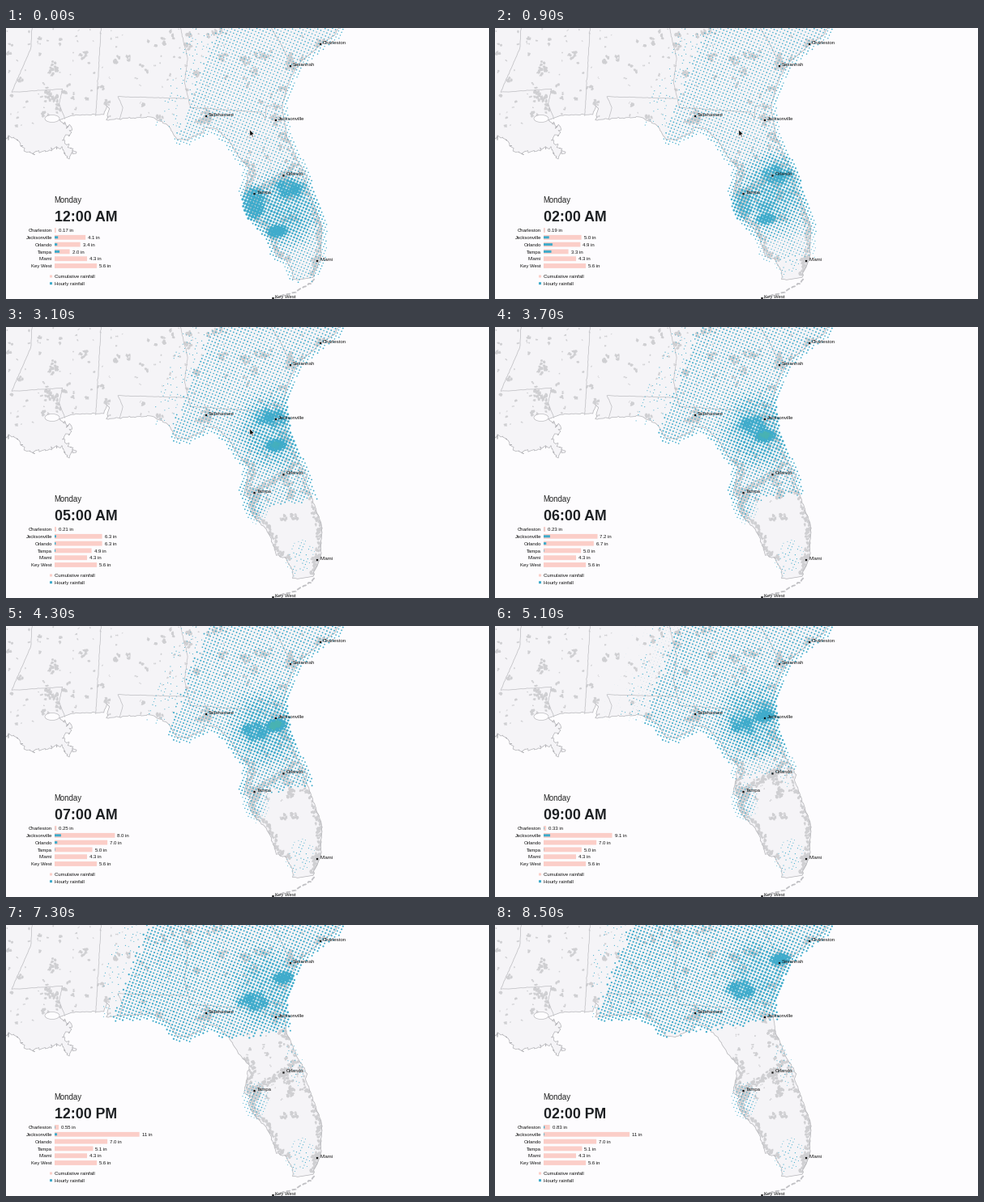
Animation of 596x335 px, one loop 8.6 s. Source, as a matplotlib script:

```python
import numpy as np
import matplotlib.pyplot as plt
from matplotlib.animation import FuncAnimation
from matplotlib.collections import PolyCollection
from matplotlib.patches import Ellipse, Polygon, Rectangle
from matplotlib.path import Path

W, H, DPI = 596, 335, 100
FRAMES, STEP = 86, 100
PX = 72 / DPI
SEA, LAND, EDGE, URBAN = "#fdfcfe", "#f5f4f7", "#b2b2b6", "#cfcfd2"
PINK, BLUE, INK = "#fbcec8", "#3fabca", "#111111"
RGB_LOW = np.array([63, 171, 203]) / 255
RGB_HIGH = np.array([72, 178, 178]) / 255
rng = np.random.default_rng(7)


def project(points):
    """Equidistant conic projection from (lon, lat) to stage pixels."""
    lon, lat = np.radians(np.asarray(points, float)).T
    lat0, lon0, radius = np.radians(29), np.radians(-83), 2189
    rho0 = radius / np.tan(lat0)
    rho = rho0 + radius * (lat0 - lat)
    a = np.sin(lat0) * (lon - lon0)
    return np.c_[288.8 + rho * np.sin(a), 164.1 - rho0 + rho * np.cos(a)]


def roughen(pts, jitter, step=2.5):
    """Subdivide a line and shake the new points."""
    out = []
    for p, q in zip(pts[:-1], pts[1:]):
        n = max(1, int(np.hypot(*(q - p)) / step))
        s = np.linspace(0, 1, n, endpoint=False)[:, None]
        part = p + (q - p) * s
        part[1:] += rng.normal(0, jitter, (n - 1, 2))
        out.append(part)
    return np.vstack(out + [pts[-1:]])


# Key points of the coast and the state lines (lon, lat)
ATLANTIC = [(-78.6, 33.85), (-79.18, 33.25), (-79.38, 33.0), (-79.87, 32.74),
            (-80.67, 32.2), (-81.05, 31.75), (-81.28, 31.2), (-81.42, 30.7),
            (-81.27, 29.85), (-80.92, 29.05), (-80.53, 28.46), (-80.6, 28.3),
            (-80.1, 27.0), (-80.03, 26.75), (-80.12, 25.8), (-80.4, 25.2)]
GULF = [(-80.95, 25.13), (-81.13, 25.15), (-81.12, 25.4), (-81.35, 25.8),
        (-81.7, 25.9), (-81.87, 26.43), (-82.1, 26.8), (-82.45, 27.1),
        (-82.7, 27.52), (-82.43, 27.92), (-82.65, 27.7), (-82.85, 27.9),
        (-82.65, 28.75), (-83.06, 29.13), (-83.4, 29.65), (-83.9, 30.03),
        (-84.35, 30.06), (-84.35, 29.92), (-85.0, 29.65), (-85.35, 29.68),
        (-85.7, 30.12), (-86.3, 30.37), (-88.0, 30.23), (-87.9, 30.6),
        (-88.0, 30.68), (-88.1, 30.4), (-89.3, 30.32)]
DELTA = [(-89.75, 30.15), (-89.25, 29.85), (-89.6, 29.5), (-89.05, 29.15),
         (-89.4, 28.95), (-89.6, 29.3), (-90.2, 29.1), (-90.9, 29.05),
         (-91.4, 29.5), (-92.2, 29.55)]
BORDERS = [
    [(-91.0, 33.3), (-91.0, 32.4), (-91.6, 30.95), (-89.7, 31.16),
     (-89.8, 30.67), (-89.55, 30.2)],
    [(-88.35, 33.4), (-88.4, 30.35)],
    [(-87.5, 30.28), (-87.4, 30.65), (-87.6, 31.0), (-85.0, 31.0)],
    [(-85.4, 33.6), (-85.0, 32.3), (-85.1, 31.5), (-84.86, 30.71),
     (-82.22, 30.57), (-82.05, 30.36), (-82.02, 30.78), (-81.43, 30.71)],
    [(-81.95, 33.5), (-81.42, 32.75), (-81.15, 32.25), (-80.88, 32.04)],
]
ISLANDS = [(-80.35, 25.15), (-80.6, 24.95), (-81.1, 24.72), (-81.8, 24.56)]
CITIES = [("Charleston", 388, 20), ("Savannah", 351, 47),
          ("Jacksonville", 333, 114), ("Tallahassee", 247, 109),
          ("Orlando", 342.5, 182.5), ("Tampa", 306.5, 205),
          ("Miami", 384, 288), ("Key West", 329.5, 334)]

fig = plt.figure(figsize=(W / DPI, H / DPI), dpi=DPI, facecolor=SEA)
ax = fig.add_axes([0, 0, 1, 1])
ax.set(xlim=(0, W), ylim=(H, 0))
ax.axis("off")

# Base map
east, west = roughen(project(ATLANTIC), 0.4), roughen(project(GULF), 0.5)
coast = np.vstack([east, west, roughen(project(DELTA), 1.7, 2)])
shape = np.vstack([coast, [(-30, 140), (-30, -30), (440, -30)]])
land = Path(shape)
ax.add_patch(Polygon(shape, fc=LAND, ec="none", zorder=1))


def town(x, y, rx, ry):
    """Ragged patch made of small overlapping polygons."""
    polys = []
    for _ in range(max(2, int(rx * ry / 2.5))):
        a, d = rng.uniform(0, 2 * np.pi), np.sqrt(rng.uniform(0, 1))
        cx, cy = x + rx * d * np.cos(a), y + ry * d * np.sin(a)
        t = np.linspace(0, 2 * np.pi, 7, endpoint=False)
        r = min(rx, ry, 2.4) * rng.uniform(0.4, 1.1, 7)
        polys.append(np.c_[cx + r * np.cos(t), cy + r * np.sin(t)])
    return polys


def scatter_towns(count, x0, x1, y0, y1, big):
    polys = []
    for x, y in rng.uniform((x0, y0), (x1, y1), (count, 2)):
        size = 1 + big * rng.uniform() ** 3
        polys += town(x, y, size * rng.uniform(0.7, 1.4), size)
    return polys


patches = scatter_towns(190, 0, 410, 0, 122, 4.5)
patches += scatter_towns(60, 295, 375, 125, 240, 4)
for _, x, y in CITIES[:-1]:
    patches += town(x, y, 7, 7)
for x, y in east[::3]:
    if y > 130:
        patches += town(x - 3, y, 2 + 2.5 * (y > 225), 4)
for x, y in west[::3]:
    if 165 < y < 285 and x < 345:
        patches += town(x + 4, y, 4, 4)
for s in np.linspace(0, 1.4, 8):
    patches += town(306 + 36 * s, 205 - 24 * s, 5, 4)
urban = ax.add_collection(PolyCollection(patches, fc=URBAN, ec="none", zorder=2))
urban.set_clip_path(land, ax.transData)

ax.plot(*coast.T, color=EDGE, lw=0.7 * PX, zorder=3)
for b in BORDERS:
    ax.plot(*roughen(project(b), 0.2).T, color="#c2c2c6", lw=0.8 * PX, zorder=3)
ax.add_patch(Ellipse((57, 112), 18, 9, fc=SEA, ec=EDGE, lw=0.6 * PX, zorder=3))
ax.plot(*roughen(project(ISLANDS), 0.8).T, color="#c0c0c4", lw=1.8 * PX,
        ls=(0, (3, 1.2)), zorder=3)


# Rain lattice: every third cell of a polar stereographic weather grid
MESH, MERIDIAN = 2496.35, np.radians(-105)


def to_grid(lon, lat):
    lon, lat = np.radians(lon), np.radians(lat)
    r = MESH * np.cos(lat) / (1 + np.sin(lat))
    return r * np.sin(lon - MERIDIAN), r * np.cos(lon - MERIDIAN)


def from_grid(x, y):
    lat = np.pi / 2 - 2 * np.arctan(np.hypot(x, y) / MESH)
    return np.degrees(np.c_[np.arctan2(x, y) + MERIDIAN, lat])


cells = 3 * np.arange(-150, 151)
ox, oy = to_grid(-83.554, 32.77)
gi, gj = np.meshgrid(ox + cells, oy + cells)
grid = project(from_grid(gi.ravel(), gj.ravel()))
grid = grid[(grid[:, 0] > 120) & (grid[:, 0] < 425)
            & (grid[:, 1] > -4) & (grid[:, 1] < H)]
near = np.any([land.contains_points(grid + 7 * np.array([np.cos(a), np.sin(a)]))
               for a in np.arange(0, 2 * np.pi, 0.6)], axis=0)
gx, gy = grid[near].T
grain = rng.uniform(0.88, 1.12, gx.size)
chance = rng.uniform(0, 1, gx.size)
lumps = 0.88 + 0.2 * np.sin(gx / 3.5 + gy / 9) * np.sin(gy / 4 - gx / 11)


def bump(x, y, sx, sy, deg=0):
    a = np.radians(deg)
    dx, dy = gx - x, gy - y
    u = (dx * np.cos(a) + dy * np.sin(a)) / sx
    v = (dy * np.cos(a) - dx * np.sin(a)) / sy
    return np.exp(-(u * u + v * v) ** 2)


def rain(h):
    """Dot radii at a whole hour."""
    # wide sheet whose south edge retreats while its west edge advances
    edge = np.interp(h, [0, 7, 10, 14], [258, 246, 178, 165])
    south = np.interp(h, [0, 3, 7, 10, 14], [325, 248, 212, 152, 128])
    across = gx + 0.38 * gy - edge
    sheet = (across > 8 * chance) & (gy + 0.15 * (gx - 300) < south - 8 * chance)
    fringe = (across > -30) & (across <= 8) & (chance < 0.3) & (gy < 130)

    # two heavy cells that travel north
    ax_, ay = (np.interp(h, [0, 10, 14], [335, 332, 352]),
               np.interp(h, [0, 3, 5, 14], [251, 205, 146, 42]))
    bx, by = (np.interp(h, [0, 3, 7, 14], [351, 345, 308, 304]),
              np.interp(h, [0, 3, 5, 7, 14], [199, 150, 112, 130, 80]))
    peak = 2.75 + 0.4 * np.exp(-((h - 7.5) / 3) ** 2)
    belt = (0.8 - 0.03 * h) * bump((ax_ + bx) / 2, (ay + by) / 2, 42, 45)

    light = np.where(sheet, 0.75 + 0.025 * h + belt, 0.55 * fringe) * grain
    tampa = (0.75 + 1.5 * np.exp(-h / 3)) * bump(307, 217, 19, 27) * grain
    showers = 0.62 * np.maximum(bump(363, 285, 20, 30, 20),
                                bump(357, 172, 12, 36, -15)) * (chance < 0.6)
    r = np.max([light, tampa, showers, peak * bump(ax_, ay, 16, 9, -8),
                2.6 * lumps * bump(bx, by, 25, 15, 5)], axis=0)
    return np.where(r < 0.4, 0, r)


fields = np.array([rain(h) for h in range(15)])
dots = ax.scatter(gx, gy, s=0, lw=0, zorder=4)


def label(x, y, text, size=6, color=INK, **kw):
    """Text whose capitals are centred on y; size in pixels."""
    return ax.text(x, y + 0.36 * size, text, fontsize=size * PX, color=color,
                   family="Liberation Sans", va="baseline", zorder=6, **kw)


def box(x, y, w, h, color):
    return ax.add_patch(Rectangle((x, y - h / 2), w, h, fc=color, ec="none",
                                  zorder=5, snap=False))


for name, x, y in CITIES:
    box(x - 1.1, y, 2.2, 2.2, INK)
    label(x + 3, y - 2.2, name)

# Side panel: running totals in inches at key hours
label(59.5, 212.3, "Monday", 9.7, "#222222")
clock = label(59.5, 232.8, "", 17.7, "#1c1f22", weight="bold")
HOURS = [-1, 0, 2, 3, 5, 7, 10, 12, 14]
TOTALS = {"Charleston": [.17, .17, .2, .21, .21, .25, .43, .55, .83],
          "Jacksonville": [3.65, 4.1, 5.55, 5.9, 6.3, 8, 10.6, 11.25, 11.4],
          "Orlando": [3.05, 3.4, 5.75, 6, 6.3, 7, 7, 7, 7],
          "Tampa": [1.35, 2, 4.05, 4.7, 4.9, 5, 5.1, 5.1, 5.1],
          "Miami": [4.3] * 9, "Key West": [5.6] * 9}
SCALE = 9.3
rows = []
for k, name in enumerate(TOTALS):
    y = 250 + 8.8 * k
    label(57, y, name, ha="right")
    rows.append((name, box(60, y, 0, 5.8, PINK), box(60, y, 0, 3, BLUE),
                 label(0, y, "")))
for y, color, text in ((307, PINK, "Cumulative rainfall"),
                       (315.7, BLUE, "Hourly rainfall")):
    box(54, y, 3, 3, color)
    label(60, y, text)

ARROW = [(0, 0), (0, 8.2), (1.9, 6.5), (3.2, 9.5), (4.5, 8.9), (3.2, 6),
         (5.7, 5.9)]
cursor = ax.add_patch(Polygon(np.array(ARROW) + (300.8, 125.6), fc=INK,
                              ec="white", lw=0.6 * PX, zorder=8))


def amount(v):
    digits = 2 if v < 1 else 1 if v < 9.95 else 0
    return f"{v:.{digits}f} in"


def draw(n):
    t = n * STEP
    hour, phase = divmod(t + 400, 600)
    p = min(1, (phase + 100) / 500)
    ease = 4 * p ** 3 if p < 0.5 else 1 - 4 * (1 - p) ** 3
    prev = max(hour - 1, 0)
    now = prev + (hour - prev) * ease

    r = fields[prev] + (fields[hour] - fields[prev]) * ease
    heat = np.clip((r - 2.8) / 0.25, 0, 1)[:, None]
    dots.set_sizes((2 * r * PX) ** 2)
    dots.set_facecolors(RGB_LOW + (RGB_HIGH - RGB_LOW) * heat)
    cursor.set_visible(t < 3200)

    clock.set_text(f"{(hour - 1) % 12 + 1:02d}:00 {'AM' if hour < 12 else 'PM'}")
    for name, total, recent, text in rows:
        before, v = np.interp([now - 1, now], HOURS, TOTALS[name])
        total.set_width(v * SCALE)
        recent.set_width((v - before) * SCALE)
        text.set_x(63 + v * SCALE)
        text.set_text(amount(v))
    return [dots, clock]


anim = FuncAnimation(fig, draw, frames=FRAMES, interval=STEP, repeat=True,
                     init_func=lambda: draw(0), blit=False)
plt.show()
```
